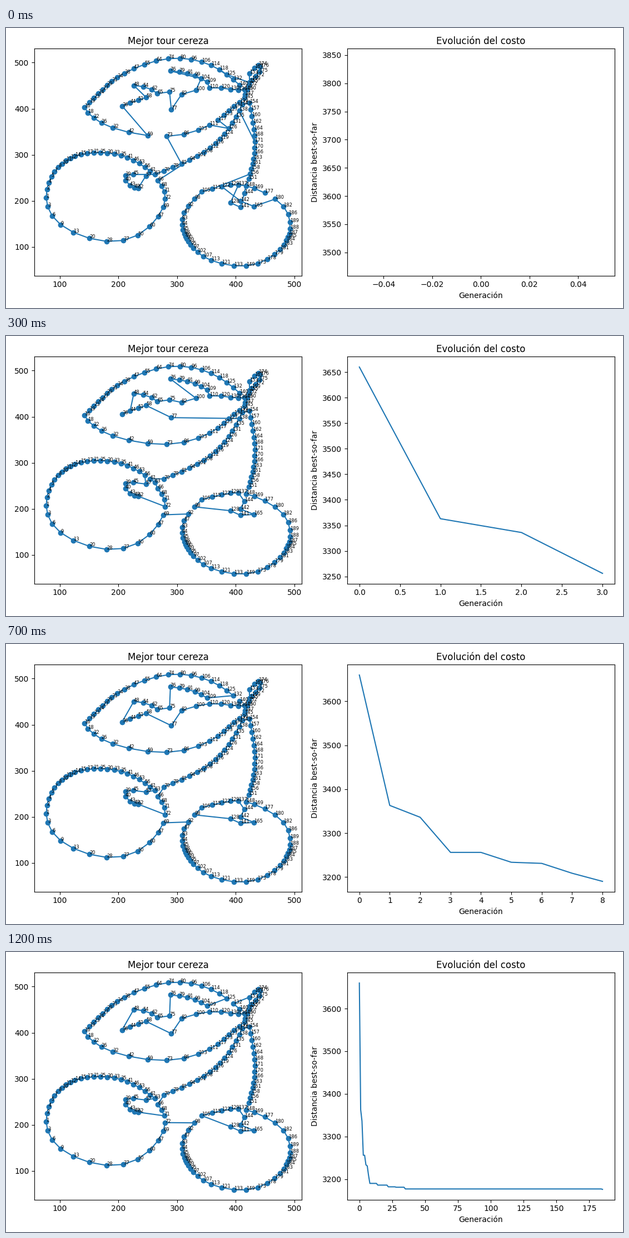
Animation of 1110x505 px, one loop 1300 ms. Source, as a matplotlib script:

```python
import numpy as np
import matplotlib.pyplot as plt
from matplotlib.animation import FuncAnimation

WIDTH, HEIGHT, DPI = 1110, 505, 100
INTERVAL = 100


def spline(knots, count):
    """Sample a natural cubic spline through the knots at even parameters."""
    p = np.array(knots, float)
    n = len(p)
    system = 4 * np.eye(n) + np.eye(n, k=1) + np.eye(n, k=-1)
    system[0, 0] = system[-1, -1] = 2
    padded = np.pad(p, ((1, 1), (0, 0)), mode="edge")
    slope = np.linalg.solve(system, 3 * (padded[2:] - padded[:-2]))
    t = np.linspace(0, n - 1, count)
    i = np.minimum(t.astype(int), n - 2)
    u = (t - i)[:, None]
    a, b, step = slope[i], slope[i + 1], p[i + 1] - p[i]
    return p[i] + u * (a + u * (3 * step - 2 * a - b + u * (a + b - 2 * step)))


cities = {}  # name such as "L5" -> map position
base_edges = set()


def path(*names):
    return {frozenset(pair) for pair in zip(names, names[1:])}


def links(text):
    """Edges from a text such as 'L3-R38 R0-P0'."""
    return {frozenset(pair.split("-")) for pair in text.split()}


def chain(key, count, knots, linked=True, closed=False):
    """Spread cities along a curve and join the neighbours."""
    names = [f"{key}{i}" for i in range(count)]
    spots = spline(knots + knots[:1], count + 1) if closed else spline(knots, count)
    cities.update(zip(names, spots))
    if linked:
        base_edges.update(path(*names, *names[:closed]))


# Left cherry with its core, right cherry with its pit
chain("L", 37, [(267, 244), (276.5, 187), (208, 114), (101, 148.5), (77.7, 224.5),
                (97, 273), (126, 297), (169, 304.5), (215, 294), (254, 265)])
chain("C", 7, [(246.5, 254), (211.5, 255), (219.5, 233.5), (233.5, 227.5)])
chain("R", 39, [(342, 220), (391.5, 234), (432, 227), (481.5, 188), (492.5, 139),
                (486, 114), (466.5, 84), (418, 59), (358, 71), (328, 97),
                (316.5, 117.5), (310, 137), (311.5, 174)], closed=True)
chain("P", 5, [(391, 196), (408, 186), (431, 188), (408, 199.5), (414.5, 216.5)],
      linked=False)

# Stems and the tip where they meet
chain("S", 16, [(262, 257.5), (334, 297), (381, 345.5), (411.5, 409.5)])
chain("T", 14, [(423.5, 412.5), (432.5, 321.5), (422, 247.5)])
chain("K", 11, [(416, 431), (422, 451), (427, 462), (440, 480.5),
                (438.5, 495), (423, 477)])

# Leaf: upper and lower edge, veins inside
chain("U", 21, [(142, 403.5), (173, 442), (210, 477), (285, 508.5), (358, 494),
                (406.5, 451.5)])
chain("D", 16, [(147.5, 391.5), (190, 358.5), (282, 340), (355.5, 364.5),
                (388.5, 396), (415, 423)])
chain("V", 6, [(288.5, 482), (324, 474.5), (351, 458)])
chain("B", 7, [(307.5, 431), (355, 445.5), (391.5, 442), (415, 441)])
chain("Q", 4, [(206, 406), (247, 424.5)])
chain("W", 5, [(226, 450.5), (242, 448), (256.5, 441.5), (266, 433), (287, 436.5)])
cities["M0"] = (290, 398)

base_edges |= links("U0-D0 U20-B5 B6-K0 B6-K1 D15-K0 S15-T0 T13-R5 K3-K10")

# A tour toggles edges of the base drawing: present ones go, others appear.
NECK_OPEN = links("L0-S0 S0-L36 L36-S1 L35-C0 L35-L36 S0-S1")
NECK_SHUT = links("L36-S0 S0-C0 L0-S1 S0-S1")


def fruit(rung, pit="01234", neck=NECK_SHUT):
    """Bridge both cherries at the given rung and visit the pit in order."""
    left, above = f"L{rung}", f"L{rung - 1}"
    right, after = f"R{41 - rung}", f"R{(42 - rung) % 39}"
    bridge = path(left, above, "C6") | path(left, right, after, f"P{pit[0]}")
    return neck | bridge | path(*("P" + i for i in pit), "R4", "R5")


FRUIT_START = links("C0-C6 C0-C1 C1-S0 C0-L36 L0-S4 S3-S4 S3-D6 S14-T6 "
                    "T12-R1 R1-R2 R2-P3 P3-P2 P2-R8 R7-R8 R4-P0 P0-P1 P1-P4 P4-R5")
FRUIT_WIDE = fruit(5, neck=NECK_OPEN) ^ links("P2-P3 P2-R8 R7-R8 R7-P3")

LEAF_START = links("V0-V4 V4-B1 V5-B2 B1-B2 Q0-D5 D5-D6 W4-M0 M0-B0 W0-Q3 "
                   "U17-U19 U18-U19 U18-K3 D9-D10 D9-S11 D10-S11")
LEAF_WIDE = links("V0-W4 Q0-M0 M0-B0 B1-B2 V5-B1 V5-B2 V4-V5 V4-K10 W0-Q3")
LEAF_CROSS = links("W0-Q1 Q3-M0 M0-S14 V0-B1 B1-B2 V5-B2 W4-B0")
LEAF_SPLIT = links("V0-U12 U12-U13 U13-V3 V2-V3 V2-B1 B0-B1 V5-B2 B2-B3 B3-U18 "
                   "U18-U19 U19-B4 B4-B5 W4-B0 B0-M0 M0-D6 D5-D6 D5-Q0 W0-Q3")
LEAF_CORE = links("Q0-W0 Q3-M0 M0-B0 V0-W4")
LEAF_A = LEAF_CORE | links("V5-U19 U19-U20")
LEAF_B = LEAF_CORE | links("V5-U18 U18-U19 U19-K3")
LEAF_C = LEAF_CORE | links("V5-U18 U18-U19 U19-K10")
DETOUR = "03124"

# Generation of each improvement, its cost and its tour
STEPS = [
    (0, 3660, FRUIT_START | LEAF_START),
    (1, 3363, FRUIT_WIDE | LEAF_WIDE),
    (2, 3336, FRUIT_WIDE | LEAF_WIDE),
    (3, 3256, fruit(4, neck=NECK_OPEN) | LEAF_CROSS),
    (5, 3233.5, fruit(3) | LEAF_SPLIT),
    (6, 3231, fruit(3, DETOUR) | LEAF_SPLIT),
    (7, 3208.5, fruit(4) | LEAF_A),
    (8, 3190, fruit(4) | LEAF_A),
    (14, 3186, fruit(3, DETOUR) | LEAF_A),
    (22, 3182, fruit(3, DETOUR) | LEAF_B),
    (28, 3181, fruit(3, DETOUR) | LEAF_C),
    (35, 3177, fruit(3) | LEAF_C),
    (185, 3176, fruit(3) | LEAF_C),
]
GENERATIONS, COSTS, TOURS = zip(*STEPS)

fig, (tour_ax, cost_ax) = plt.subplots(
    1, 2, figsize=(WIDTH / DPI, HEIGHT / DPI), dpi=DPI)
tour_ax.set(title="Mejor tour cereza", xlim=(56.4, 512.8), ylim=(37.6, 530.2))
cost_ax.set(title="Evolución del costo", xlabel="Generación",
            ylabel="Distancia best-so-far")

tour_line, = tour_ax.plot([], [], color="C0")
tour_ax.plot(*zip(*cities.values()), "o", color="C0")
# Cities are numbered from left to right.
for number, (x, y) in enumerate(sorted(map(tuple, cities.values())), start=1):
    tour_ax.text(x, y, str(number), fontsize=6)
cost_line, = cost_ax.plot([], [], color="C0")


def draw(frame):
    segments = [(*(cities[name] for name in edge), (np.nan, np.nan))
                for edge in base_edges ^ TOURS[frame]]
    tour_line.set_data(*np.concatenate(segments).T)

    gens = np.arange(GENERATIONS[frame] + 1)
    latest = np.searchsorted(GENERATIONS, gens, side="right") - 1
    cost_line.set_data(gens, np.take(COSTS, latest))
    cost_ax.relim()
    cost_ax.autoscale_view()
    return tour_line, cost_line


draw(0)
fig.tight_layout()
anim = FuncAnimation(fig, draw, frames=len(STEPS), interval=INTERVAL,
                     repeat=True, repeat_delay=0)
plt.show()
```
